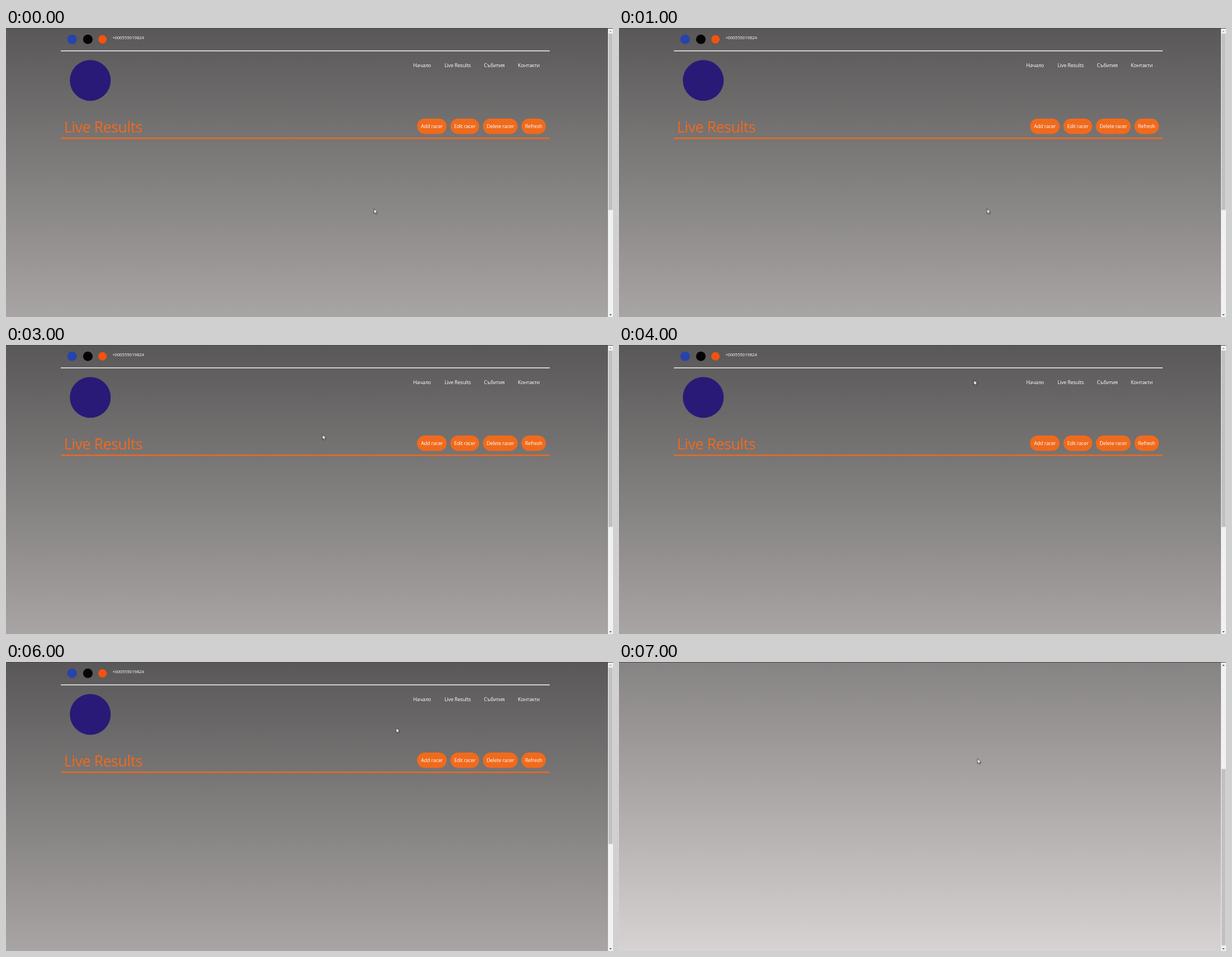
Animation of 1084x517 px, one loop 8000 ms. Source, as an HTML page:

```html
<!DOCTYPE html>
<html lang="bg">
<head>
<meta charset="utf-8">
<title>Live Results</title>
<style>
  html, body { margin: 0; width: 100%; height: 100%; overflow: hidden; background: #a9a5a5; }
  svg { display: block; width: 1084px; height: 517px; }
  text { font: 9.1px "Open Sans", "Noto Sans", sans-serif; letter-spacing: -.022em; fill: #fff; }
  .mid { text-anchor: middle; }
  .phone { font-size: 7.9px; }
  .title { font-size: 27px; fill: #f06a1c; }
  .accent { fill: #f06a1c; }

  .page, .thumb, .arrow, .beam, .hover, .up { animation: 8s step-end infinite; }
  .page { animation-name: page; }
  .thumb { animation-name: thumb; }
  .arrow { animation-name: arrow; }
  .beam, .hover { animation-name: hover; }
  .up { animation-name: up; }

  @keyframes page {
    0% { transform: translateY(0); }
    87.5%, 100% { transform: translateY(-296px); }
  }
  @keyframes thumb {
    0% { transform: translateY(0); }
    87.5%, 100% { transform: translateY(181.5px); }
  }
  @keyframes up {
    0% { fill: #a3a3a3; }
    87.5%, 100% { fill: #505050; }
  }
  @keyframes hover {
    0% { opacity: 0; }
    62.5% { opacity: 1; }
    75%, 100% { opacity: 0; }
  }
  @keyframes arrow {
    0% { transform: translate(657px, 323px); opacity: 1; }
    25% { transform: translate(495px, 273px); opacity: 1; }
    37.5% { transform: translate(565px, 160px); opacity: 1; }
    50% { transform: translate(633.5px, 62.5px); opacity: 1; }
    62.5% { transform: translate(752px, 66px); opacity: 0; }
    75% { transform: translate(696.5px, 117.5px); opacity: 1; }
    87.5%, 100% { transform: translate(640px, 172.5px); opacity: 1; }
  }
</style>
</head>
<body>
<svg viewBox="0 0 1084 517">
  <defs>
    <linearGradient id="sky" x2="0" y2="1">
      <stop offset="0" stop-color="#595757"/>
      <stop offset=".364" stop-color="#868383"/>
      <stop offset=".636" stop-color="#a9a5a4"/>
      <stop offset="1" stop-color="#d6d3d2"/>
    </linearGradient>
  </defs>

  <g class="page">
    <rect width="1084" height="813" fill="url(#sky)"/>

    <circle cx="118" cy="20.3" r="8.5" fill="#2743ad"/>
    <circle cx="146.2" cy="20.3" r="8.5" fill="#050505"/>
    <circle cx="172.3" cy="20.3" r="7.5" fill="#f4520f"/>
    <text class="phone" x="190" y="20.3">+000555019824</text>
    <rect x="98" y="40.2" width="873" height="1.4" fill="#fff"/>

    <circle cx="150.5" cy="93.7" r="36.5" fill="#2a1a78"/>

    <rect class="accent hover" x="721" y="53" width="44.5" height="27.4" rx="13.7"/>
    <g class="mid">
      <text x="743" y="70">Начало</text>
      <text x="806.5" y="70">Live Results</text>
      <text x="872" y="70">Събития</text>
      <text x="933.5" y="70">Контакти</text>
    </g>

    <text class="title" x="103.6" y="187">Live Results</text>
    <rect class="accent" x="98" y="196" width="873" height="2.4"/>

    <g class="accent">
      <rect x="734" y="162" width="53" height="27.4" rx="13.7"/>
      <rect x="793.6" y="162" width="51.4" height="27.4" rx="13.7"/>
      <rect x="851.6" y="162" width="62.2" height="27.4" rx="13.7"/>
      <rect x="920.4" y="162" width="43.8" height="27.4" rx="13.7"/>
    </g>
    <g class="mid">
      <text x="760.5" y="179">Add racer</text>
      <text x="819.3" y="179">Edit racer</text>
      <text x="882.7" y="179">Delete racer</text>
      <text x="942.2" y="179">Refresh</text>
    </g>
  </g>

  <rect x="1075" width="9" height="517" fill="#f1f1f1"/>
  <rect class="thumb" x="1076" y="10" width="7.4" height="315.5" fill="#c1c1c1"/>
  <path class="up" d="M1077.3 7h4.4l-2.2-2.5z"/>
  <path d="M1077.3 512h4.4l-2.2 2.5z" fill="#505050"/>
  <rect width="1084" height="1" fill="#454444"/>

  <path class="beam" d="M751.5 64.5h3m-1.5 0v9m-1.5 0h3" fill="none" stroke="#7d8793" stroke-width=".8"/>
  <g class="arrow">
    <path transform="scale(.565)" d="M.5.5V16.5L4.2 13 6.7 18.6 9.2 17.5 6.8 12H12Z"
          fill="#fff" stroke="#111" stroke-width="1.3"/>
  </g>
</svg>
</body>
</html>
```
